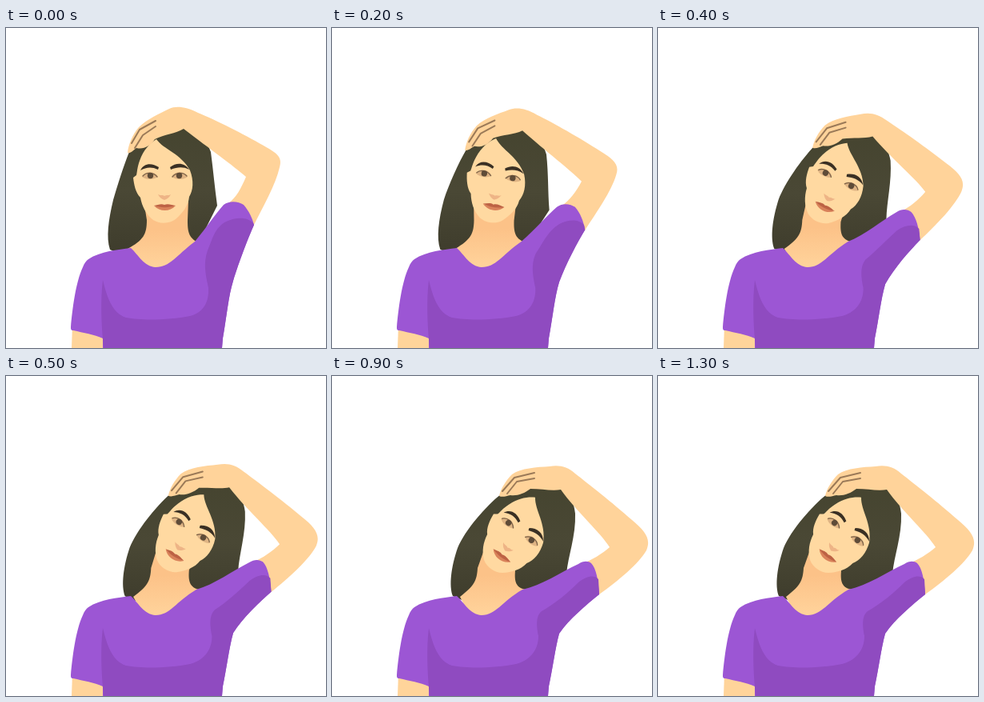
These frames come from a looping animation (400x400 px, 8 s). An HTML page:

```html
<!DOCTYPE html>
<html lang="en">
<head>
<meta charset="utf-8">
<title>Neck stretch</title>
<style>
  html, body { margin: 0; width: 100%; height: 100%; overflow: hidden; background: #fff; }
  svg { display: block; width: 100%; height: 100%; }
</style>
</head>
<body>
<svg viewBox="0 0 400 400" fill="none" stroke-linecap="round" stroke-linejoin="round">
  <defs>
    <linearGradient id="hairTone" x1="0" y1="0" x2="0" y2="1">
      <stop offset="0" stop-color="#45442f"/>
      <stop offset=".5" stop-color="#4a4835"/>
      <stop offset="1" stop-color="#3d3b2b"/>
    </linearGradient>
    <linearGradient id="neckTone" x1="0" y1="0" x2="0" y2="1">
      <stop offset=".4" stop-color="#fcc288"/>
      <stop offset=".9" stop-color="#ffd29a"/>
    </linearGradient>
  </defs>
  <path id="hair" fill="url(#hairTone)"/>
  <path id="neck" fill="url(#neckTone)"/>
  <g id="head">
    <path fill="#ffd9a1" d="M188 139C180 144 172 152 167 166C164 174 164 180 163 184L159 187C160 196 162 206 168 212C170 223 175 233 184 240C192 245 204 245 212 239C221 231 228 222 229 211C234 203 235 191 230 178C219 157 197 152 188 139Z"/>
    <g fill="#3a3024">
      <path d="M168 178C172 169 182 168 191 174L190 177C182 173 175 174 168 178Z"/>
      <path d="M205 174C213 168 223 168 229 177C221 173 214 174 206 177Z"/>
    </g>
    <g id="eye">
      <path fill="#dfb484" d="M170 186C174 179 185 178 190 186C184 190 175 190 170 186Z"/>
      <path stroke="#7d6348" stroke-width="1.3" d="M171 185C175 180 184 180 189 186"/>
      <circle cx="180.500" cy="184.500" r="3.700" fill="#5f4c38"/>
    </g>
    <use href="#eye" transform="matrix(-1 0 0 1 397 0)"/>
    <path fill="#eeb486" d="M190 208C194 210 196 208 198 210C201 208 203 210 206 208C204 212 201 214 198 215C195 214 192 212 190 208Z"/>
    <path fill="#d9825a" d="M185 222C191 224 205 224 212 222C205 230 192 230 185 222Z"/>
    <path fill="#bd6244" d="M185 222C190 221 194 219 198 221C202 219 207 221 212 222C204 225 193 225 185 222Z"/>
  </g>
  <path fill="#ffd49a" d="M83 372L122 382L121 400H82Z"/>
  <path id="arm" fill="#ffd39a"/>
  <path id="fingers" stroke="#9b7a58" stroke-width="2"/>
  <path id="shirt" fill="#9c56d4"/>
  <path id="shade" fill="#8f4bc0"/>
</svg>
<script>
  // Each part: upright pose, tilted pose, with matching commands.
  const parts = {
    hair: [
      "M154 155C147 172 139 198 134 215C128 240 125 262 130 277L160 290L235 280L264 222C261 200 259 178 256 155C248 132 228 118 205 116C180 116 160 130 154 155Z",
      "M212 147C192 163 166 193 157 215C149 238 146 262 151 275L185 290L245 280L293 248C295 225 305 200 304 172C302 150 290 138 270 130C245 125 225 130 212 147Z"
    ],
    neck: [
      "M172 215L176 240C176 258 172 265 152 276L175 305L205 305L240 268C228 262 227 254 227 240L228 215Z",
      "M192 212L182 240C181 256 178 262 160 276L175 305L205 305L243 267C229 265 228 256 229 243L236 228Z"
    ],
    arm: [
      "M152 156C153 146 158 133 166 124C176 114 192 107 204 101C212 97 225 98 240 106C262 115 296 132 322 147C338 156 346 161 342 174C337 196 322 222 309 248L280 240L278 219C288 212 294 200 300 186C284 172 256 152 222 126C212 132 198 133 186 139C180 148 172 152 163 150C160 152 156 157 152 156Z",
      "M209 150C211 141 217 131 225 123C236 115 256 114 272 113C284 111 294 113 304 122C322 136 350 158 375 180C392 194 399 204 393 218C384 234 358 256 334 273L305 255L312 235C325 230 338 222 347 214C336 196 306 170 286 142C275 144 262 141 248 141C240 147 232 150 223 149C218 150 213 152 209 150Z"
    ],
    fingers: [
      "M157 144L167 127L187 116M161 150L171 134L187 123",
      "M213 144L228 127L253 121M219 147L231 132L253 128"
    ],
    shirt: [
      "M103 289C118 279 140 277 156 275C166 284 172 298 187 299C205 299 212 285 236 267C250 250 262 232 272 221C280 215 291 217 297 221C304 229 308 238 310 246C303 262 292 290 284 316C278 335 276 360 271 388L270 400L121 400L121 388C110 383 97 381 84 378C81 378 81 376 81 374C83 352 87 318 96 299C98 294 100 291 103 289Z",
      "M103 289C118 279 140 277 156 275C166 284 172 298 187 299C205 299 212 282 238 267C262 262 286 245 308 235C314 231 320 231 324 234C330 240 333 255 334 273C318 286 296 304 284 322C279 340 276 365 271 388L270 400L121 400L121 388C110 383 97 381 84 378C81 378 81 376 81 374C83 352 87 318 96 299C98 294 100 291 103 289Z"
    ],
    shade: [
      "M309 244C302 236 288 236 275 242C260 250 258 265 252 278C246 295 250 310 253 325C254 345 245 356 230 360C205 365 170 366 150 362C132 356 126 335 121 315C118 340 119 370 122 400L270 400L271 388C276 360 278 335 284 316C292 290 303 262 310 246Z",
      "M333 254C328 248 318 250 308 258C294 272 278 285 262 294C254 300 256 315 258 325C258 345 245 356 230 360C205 365 170 366 150 362C132 356 126 335 121 315C118 340 119 370 122 400L270 400L271 388C276 365 279 340 284 322C296 304 318 286 334 273Z"
    ]
  };
  const LOOP = 8000, STEP = 100, TILT = 37, ARC = .55;
  const pivot = { x: 202, y: 244 };
  const tiltSteps = [0, .08, .25, .54, .72, .89, 1];
  const pair = /(\d+) (\d+)/g;
  const byId = id => document.getElementById(id);
  const mix = (a, b, p) => a + (b - a) * p;

  // Moves a point partly straight and partly along an arc about the neck.
  function between(x0, y0, x1, y1, p) {
    const polar = (x, y) => [Math.hypot(x - pivot.x, y - pivot.y), Math.atan2(x - pivot.x, pivot.y - y)];
    const [r0, a0] = polar(x0, y0), [r1, a1] = polar(x1, y1);
    const r = mix(r0, r1, p), a = mix(a0, a1, p);
    const x = mix(mix(x0, x1, p), pivot.x + r * Math.sin(a), ARC);
    const y = mix(mix(y0, y1, p), pivot.y - r * Math.cos(a), ARC);
    return `${x.toFixed(2)} ${y.toFixed(2)}`;
  }

  function blend([from, to], p) {
    const ends = [...to.matchAll(pair)];
    let i = 0;
    return from.replace(pair, (_, x, y) => {
      const [, endX, endY] = ends[i++];
      return between(+x, +y, +endX, +endY, p);
    });
  }

  function draw(time) {
    const step = Math.floor((time % LOOP) / STEP);
    const p = tiltSteps[Math.min(step, tiltSteps.length - 1)];
    for (const id in parts) byId(id).setAttribute("d", blend(parts[id], p));
    byId("head").setAttribute("transform", `rotate(${TILT * p} ${pivot.x} ${pivot.y})`);
  }

  const start = performance.now();
  function tick() {
    draw(performance.now() - start);
    requestAnimationFrame(tick);
  }
  tick();
</script>
</body>
</html>
```
